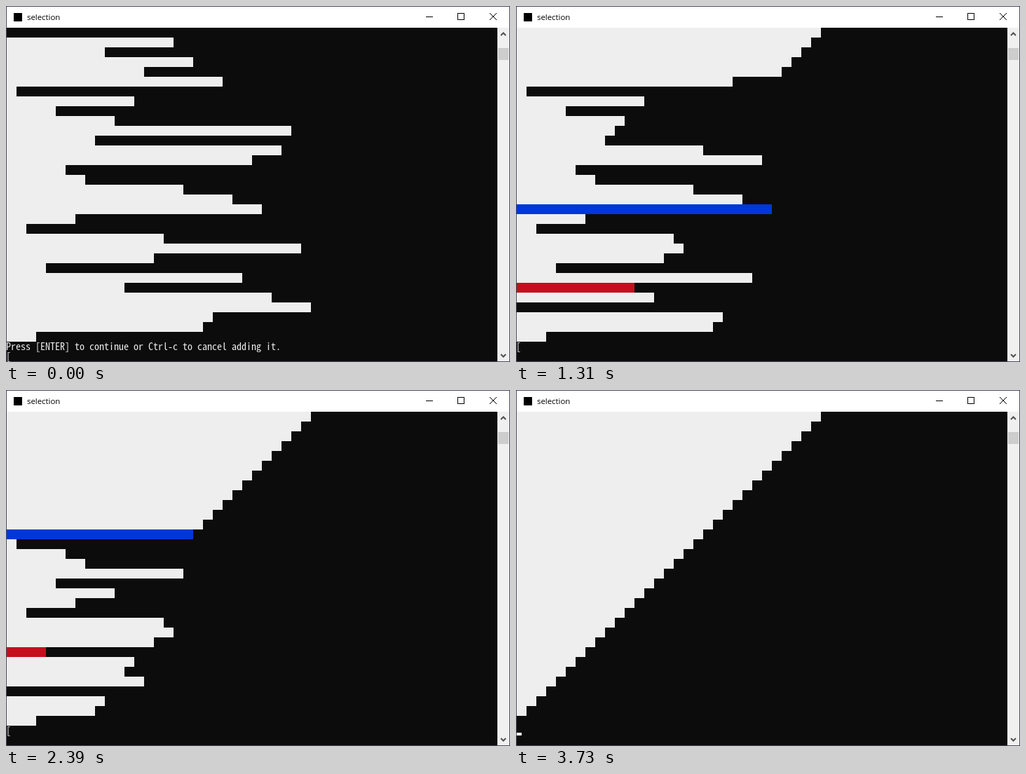
An HTML page with a canvas that plays this animation: 719x508 px, repeating every 3.91 s.

```html
<!DOCTYPE html>
<html lang="en">
<head>
<meta charset="utf-8">
<title>selection</title>
<style>
html, body { margin: 0; width: 100%; height: 100%; overflow: hidden; }
canvas { display: block; }
</style>
</head>
<body>
<canvas width="719" height="508"></canvas>
<script>
const ctx = document.querySelector('canvas').getContext('2d');
const LOOP = 3910, SORTED = 3730, CELL = 14, TOP = 31;
const VALUES = [0, 17, 10, 19, 14, 22, 1, 13, 5, 11, 29, 9, 28, 25, 6, 8,
  18, 23, 26, 7, 2, 16, 30, 15, 4, 24, 12, 27, 31, 21, 20, 3];
const LIGHT = '#eeeeee', DARK = '#0c0c0c', RED = '#c50f1f', BLUE = '#0037da';
// Pace of the sort: [time in ms, steps done]
const PACE = [[100, 0], [830, 102], [1310, 171], [1670, 223], [2390, 330], [2970, 419], [SORTED, 527]];

// Choose the size that gives the console's 7px character cell
const MONO = '"Noto Sans Mono CJK JP", "Liberation Mono", monospace';
ctx.font = `14px ${MONO}`;
const consoleFont = `${14 * 7 / ctx.measureText('0').width}px ${MONO}`;

function rect(x, y, w, h, color) {
  ctx.fillStyle = color;
  ctx.fillRect(x, y, w, h);
}

function line(color, width, ...points) {
  ctx.strokeStyle = color;
  ctx.lineWidth = width;
  ctx.beginPath();
  points.forEach(([x, y]) => ctx.lineTo(x, y));
  ctx.stroke();
}

function text(string, x, y, font, color) {
  ctx.font = font;
  ctx.fillStyle = color;
  ctx.fillText(string, x, y);
}

// One step per comparison, plus one after each swap
const steps = [];
const sorting = [...VALUES];
for (let i = 0; i < sorting.length; i++) {
  const bars = [...sorting];
  let max = i;
  steps.push({ bars, red: -1, blue: -1 });
  for (let j = i + 1; j < bars.length; j++) {
    if (bars[j] > bars[max]) max = j;
    steps.push({ bars, red: j, blue: max < j - 1 ? max : -1 });
  }
  [sorting[i], sorting[max]] = [sorting[max], sorting[i]];
}

function stepAt(time) {
  if (time >= SORTED) return steps[steps.length - 1];
  const k = PACE.findIndex(([t]) => t > time);
  const [t0, s0] = PACE[k - 1], [t1, s1] = PACE[k];
  return steps[Math.floor(s0 + 0.5 + (s1 - s0) * (time - t0) / (t1 - t0))];
}

function drawWindow() {
  rect(0, 0, 719, 508, '#4a4a5c');
  rect(1, 1, 717, 30, '#ffffff');
  rect(1, TOP, 700, 476, DARK);
  rect(11, 10, 12, 12, '#000000');
  text('selection', 30, 20, '11.4px "Open Sans", sans-serif', '#000000');

  rect(599, 15, 10, 1, '#000000');
  ctx.strokeStyle = '#000000';
  ctx.lineWidth = 1;
  ctx.strokeRect(644.5, 10.5, 9, 9);
  line('#000000', 1, [690, 10], [700, 20]);
  line('#000000', 1, [700, 10], [690, 20]);

  rect(701, TOP, 17, 476, '#f0f0f0');
  rect(702, 60, 15, 17, '#cdcdcd');
  line('#505050', 2, [706, 42], [709.5, 38.5], [713, 42]);
  line('#505050', 2, [706, 497], [709.5, 500.5], [713, 497]);
}

function drawBars({ bars, red, blue }) {
  bars.forEach((value, row) => {
    const color = row === red ? RED : row === blue ? BLUE : LIGHT;
    rect(1, TOP + row * CELL, value * CELL, CELL, color);
  });
}

function draw(time) {
  drawWindow();
  if (time < 100) {
    drawBars(steps[0]);
    text('Press [ENTER] to continue or Ctrl-c to cancel adding it.', 0, 491, consoleFont, LIGHT);
    text('[', 0, 505, consoleFont, LIGHT);
    return;
  }
  // The console refreshes every 20 ms
  const tick = time < 130 ? 100 : Math.floor((time - 10) / 20) * 20 + 10;
  drawBars(stepAt(tick));
  if (tick < SORTED) text('[', 0, 491, consoleFont, LIGHT);
  else rect(1, 489, 7, 4, '#ffffff');
}

const start = performance.now();
function frame() {
  draw((performance.now() - start) % LOOP);
  requestAnimationFrame(frame);
}
frame();
</script>
</body>
</html>
```
